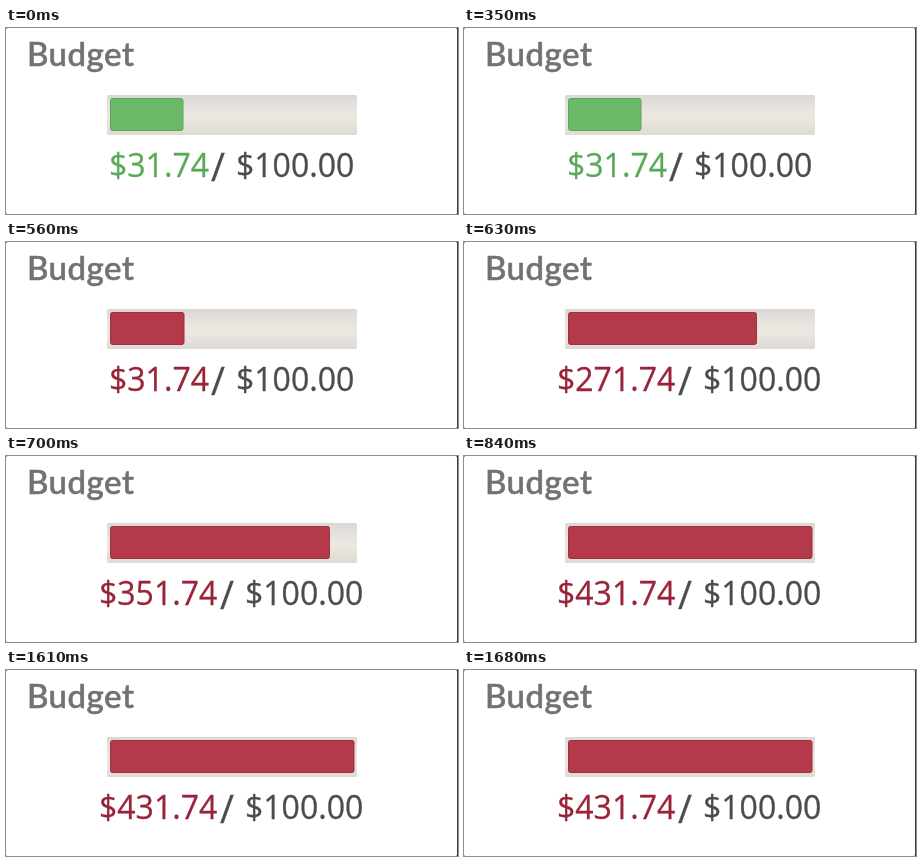
An HTML page for the animation above (2.66 s loop, 452 by 186 pixels).

```html
<!DOCTYPE html>
<html lang="en">
<head>
<meta charset="utf-8">
<title>Budget</title>
<style>
html, body { margin: 0; width: 100%; height: 100%; overflow: hidden; background: #fff; }
svg { display: block; width: 452px; height: 186px; }
text { font: 500 32px "Open Sans", sans-serif; fill: #4d4b4c; stroke: #4d4b4c; stroke-width: .3; }
#title { font: 500 33px Lato, sans-serif; letter-spacing: .5px; fill: #737173; stroke: #737173; stroke-width: .6; }
#slash { font-size: 38px; }
</style>
</head>
<body>
<svg viewBox="0 0 452 186">
  <defs>
    <linearGradient id="track" x2="0" y2="1">
      <stop stop-color="#dbd7d2"/><stop offset=".2" stop-color="#e3dfda"/>
      <stop offset=".55" stop-color="#ebe8e2"/><stop offset="1" stop-color="#dedad4"/>
    </linearGradient>
  </defs>
  <rect width="452" height="186" fill="#3c3c3c"/>
  <rect width="451" height="186" rx="1.5" fill="#fff"/>
  <text id="title" x="21" y="38">Budget</text>
  <rect x="101" y="67" width="250" height="40" rx="1.5" fill="url(#track)"/>
  <rect id="bar" x="104.5" y="70.5" height="32" rx="2"/>
  <text id="spent" y="149"></text>
  <text id="slash" y="153">/</text>
  <text id="limit" y="149">$100.00</text>
</svg>
<script>
const [bar, spent, slash, limit] = ['bar', 'spent', 'slash', 'limit'].map(id => document.getElementById(id));
const LOOP = 2660;
// start time, amount, right edge of the bar
const steps = [
  [0, 31.74, 177.5], [560, 31.74, 178.5], [630, 271.74, 293],
  [700, 351.74, 324], [770, 431.74, 341], [840, 431.74, 348.5]
];

function paint(el, fill, stroke) {
  el.style.fill = fill;
  el.style.stroke = stroke;
}

function draw(now) {
  const t = now % LOOP;
  const [start, amount, edge] = steps.filter(s => s[0] <= t).pop();
  const over = start >= 560, wide = amount > 100;
  const ink = over ? '#992338' : '#5aa958';
  bar.setAttribute('width', edge - 105);
  paint(bar, over ? '#b43a49' : '#6bb966', over ? '#9e3040' : '#5ca65a');
  paint(spent, ink, ink);
  spent.textContent = '$' + amount.toFixed(2);
  spent.setAttribute('x', wide ? 93 : 103);
  slash.setAttribute('x', wide ? 214 : 205);
  limit.setAttribute('x', wide ? 239 : 230);
  requestAnimationFrame(draw);
}
draw(performance.now());
</script>
</body>
</html>
```
